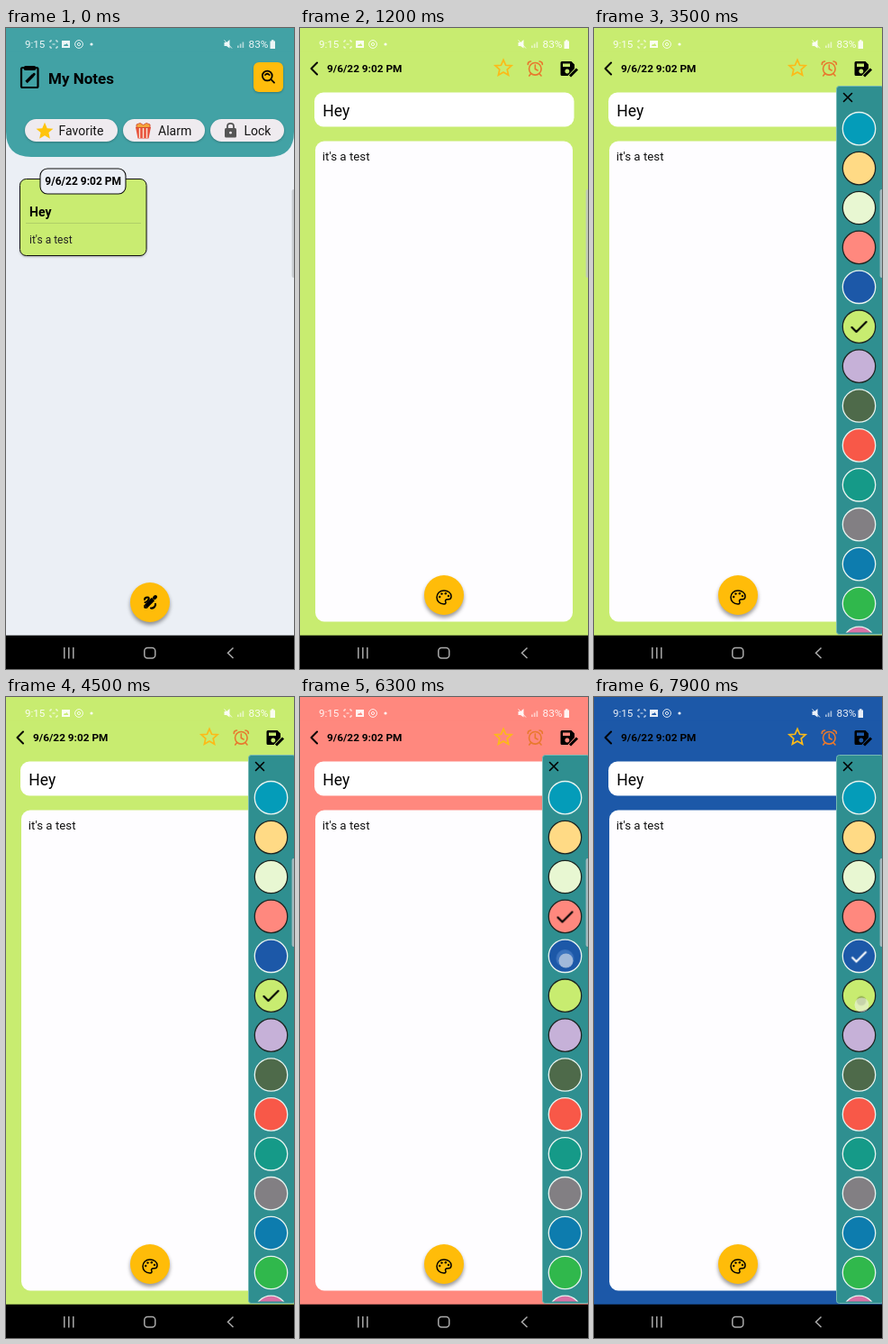
These frames come from a looping animation (320 px wide and 711 px high, 8000 ms). An HTML page:

```html
<!DOCTYPE html>
<html lang="en">
<head>
<meta charset="utf-8">
<title>Notes</title>
<style>
  html, body { margin: 0; width: 100%; height: 100%; overflow: hidden; background: #120f0f; }
  svg { position: absolute; left: 0; width: 320px; display: block; font-family: Roboto, "Liberation Sans", sans-serif; }
  .screen { top: 26px; height: 648px; }
  .frame { top: 0; height: 711px; }
  .b { font-weight: 700; }
  .line { fill: none; stroke: #000; stroke-linecap: round; stroke-linejoin: round; }
  .shadow { filter: drop-shadow(0 3px 2px #0006); }
  .soft { filter: drop-shadow(0 1px 1px #0004); }

  .list, .scrim, .note, .tint, .mini, .panel, .check { animation: 8s linear infinite; }
  .list { transform-origin: 160px 324px; animation-name: recede; }
  .scrim { animation-name: dim; }
  .note { transform-origin: 0 0; animation-name: open; }
  .tint { animation-name: tint; animation-timing-function: step-end; }
  .share { animation-name: share; }
  .mask { animation-name: mask; }
  .mini { transform-origin: 160px 629px; }
  .panel { animation-name: slide; }
  .lime { animation-name: lime; }
  .coral { animation-name: coral; }
  .navy { animation-name: navy; }

  /* --t is the moment of the tap within the loop */
  .tap circle { opacity: 0; transform-box: fill-box; transform-origin: center;
    animation: 8s linear calc(var(--t) - 8s) infinite; }
  .tap .ripple { animation-name: ripple; }
  .tap .dot { fill: #f2f2f2; animation-name: dot; }

  @keyframes recede {
    0%, 8.75% { transform: none; }
    11.25%, 100% { transform: scale(.955); }
  }
  @keyframes dim {
    0%, 8.75% { opacity: 0; }
    11.25%, 100% { opacity: .32; }
  }
  @keyframes open {
    0%, 8.75% { opacity: 0; transform: translate(15px, 141px) scale(.444); clip-path: inset(0 0 454px 0 round 14px); }
    9.6% { opacity: 1; }
    11.25% { transform: translate(6.5px, 59px) scale(.767); clip-path: inset(0 0 188px 0 round 3px);
      animation-timing-function: ease-out; }
    14.5%, 100% { opacity: 1; transform: none; clip-path: inset(0 0 0 0 round 0px); }
  }
  @keyframes tint {
    0% { fill: #42a2a5; }
    8.75% { fill: #c8ec70; }
    68.6% { fill: #ff887e; }
    81.2% { fill: #1c58a8; }
    100% { fill: #1c58a8; }
  }
  @keyframes share {
    0%, 26.5% { transform: scale(.4); }
    27.5% { transform: translateY(-31px) scale(.72); }
    30%, 35.5% { transform: translateY(-100px) scale(.85); }
    37.5%, 100% { transform: scale(.4); }
  }
  @keyframes mask {
    0%, 26.5% { transform: scale(.4); }
    27.5% { transform: translateY(-15px) scale(1.05); }
    30%, 35.5% { transform: translateY(-52px) scale(.85); }
    37.5%, 100% { transform: scale(.4); }
  }
  @keyframes slide {
    0%, 36% { transform: translateX(54px); animation-timing-function: ease-out; }
    40%, 100% { transform: none; }
  }
  @keyframes lime {
    0%, 68.1% { transform: scale(1); }
    70.3%, 100% { transform: scale(0); }
  }
  @keyframes coral {
    0%, 68.8% { transform: scale(0); }
    71%, 80.4% { transform: scale(1); }
    82.6%, 100% { transform: scale(0); }
  }
  @keyframes navy {
    0%, 81.2% { transform: scale(0); }
    83.4%, 100% { transform: scale(1); }
  }
  @keyframes ripple {
    0% { opacity: var(--o, .26); transform: scale(.2); }
    1.7% { opacity: var(--o, .26); transform: scale(1); }
    2.6% { opacity: var(--o, .26); transform: scale(1); }
    4.5%, 100% { opacity: 0; transform: scale(1); }
  }
  @keyframes dot {
    0%, 2.3% { opacity: .55; }
    3%, 100% { opacity: 0; }
  }
</style>
</head>
<body>

<svg class="screen list" viewBox="0 26 320 648">
  <defs>
    <path id="star" d="M0-9 2.6-3 9-2.5 4.2 1.7 5.6 8 0 4.6-5.6 8-4.2 1.7-9-2.5-2.6-3Z"/>
    <path id="tick" class="line" d="M-8 1-3 6 8-5" stroke-width="2.2"/>
    <g id="fab">
      <circle r="22" fill="#ffbc09"/>
    </g>
  </defs>
  <rect y="26" width="320" height="648" fill="#ebeff5"/>
  <path d="M0 26H320V115Q320 143 292 143H28Q0 143 0 115Z" fill="#42a2a5"/>

  <g class="line" stroke-width="2.2">
    <rect x="17" y="44" width="18.5" height="22" rx="1.5"/>
    <path d="M22 44.5H31" stroke-width="5"/>
    <path d="M22.5 60 30 52.5" stroke-width="3.4" stroke-linecap="butt"/>
    <path d="M30.5 52 31.2 51.3" stroke-width="3"/>
  </g>
  <text class="b" x="47" y="61.5" font-size="17">My Notes</text>

  <rect class="soft" x="275" y="38" width="33" height="33" rx="6" fill="#ffbc0c"/>
  <g class="line" stroke-width="1.8">
    <circle cx="290.3" cy="53" r="5.4"/>
    <path d="M294.5 57.2 298 60.7M288 52Q290.3 49.5 292.6 52"/>
  </g>

  <g class="soft" fill="#efebef">
    <rect x="21" y="101" width="103" height="25" rx="12.5"/>
    <rect x="130" y="101" width="91" height="25" rx="12.5"/>
    <rect x="227" y="101" width="82" height="25" rx="12.5"/>
  </g>
  <use href="#star" transform="translate(43 114.3) scale(1.05)" fill="#ffc40c"/>
  <path d="M144 110H161L158.5 122.5H146.5Z" fill="#e8523c"/>
  <path d="M148.5 111V122M152.5 111V122M156.5 111V122" stroke="#fbe6d4" stroke-width="1.4"/>
  <path d="M145 110.5V107L149 105.5 152.5 107.5 156 105.5 160 107V110.5Z" fill="#f4a53a" stroke="#cf4530" stroke-width=".8"/>
  <rect x="243" y="111" width="13" height="10.5" rx="1.5" fill="#555"/>
  <path d="M246 111V109Q246 105.8 249.5 105.8T253 109V111" fill="none" stroke="#555" stroke-width="1.8"/>
  <circle cx="249.5" cy="116.2" r="1.4" fill="#efebef"/>
  <g font-size="14" fill="#151515">
    <text x="58.5" y="118.7">Favorite</text>
    <text x="169" y="118.7">Alarm</text>
    <text x="264.5" y="118.7">Lock</text>
  </g>

  <rect class="soft" x="15.5" y="167.5" width="140.5" height="85" rx="7" fill="#c9ec71" stroke="#111"/>
  <rect x="38" y="156" width="95" height="28" rx="8" fill="#ebeff5" stroke="#111" stroke-width="1.1"/>
  <text class="b" x="43.3" y="174.3" font-size="12">9/6/22 9:02 PM</text>
  <text class="b" x="26" y="209" font-size="14">Hey</text>
  <path d="M22 216.5H150" stroke="#b0cf68"/>
  <text x="26" y="238.5" font-size="12" fill="#222">it's a test</text>
  <g class="tap" style="--t: .45s"><circle class="dot" cx="102" cy="215" r="8"/></g>

  <g class="shadow"><use href="#fab" x="160" y="637"/></g>
  <g class="line">
    <path d="M155.5 641.5 163.5 633.5" stroke-width="4.6" stroke-linecap="butt"/>
    <path d="M165 632 166 631" stroke-width="4"/>
    <path d="M153.8 640.5V643.2H156.5Z" fill="#000" stroke-width="1"/>
    <path d="M154 634Q154 631.5 157 631.5T158 634.5 154.5 637" stroke-width="2"/>
    <path d="M161 643.5Q163.5 644 165 642T166 639" stroke-width="2.2"/>
  </g>
  <rect class="scrim" y="26" width="320" height="648"/>
</svg>

<svg class="screen note" viewBox="0 26 320 648">
  <rect class="tint" y="26" width="320" height="648"/>
  <path class="line" d="M19 38.5 12.5 45 19 51.5" stroke-width="2"/>
  <text class="b" x="30" y="49.3" font-size="11.8">9/6/22 9:02 PM</text>
  <use href="#star" x="226" y="44.3" fill="none" stroke="#fcba18" stroke-width="1.7"/>
  <g fill="none" stroke="#e8792e" stroke-width="1.6" stroke-linecap="round">
    <circle cx="261.3" cy="45.3" r="6.8"/>
    <path d="M261.3 41V45.5L264 47M253.3 40.5Q253 37.5 256.5 37M269.3 40.5Q269.6 37.5 266 37M256.5 50.7 254.7 53M266 50.7 268 53"/>
  </g>
  <path fill-rule="evenodd" d="M291 37H301.5L305 40.5V45L297.5 53H291Q289.5 53 289.5 51.5V38.5Q289.5 37 291 37ZM292 39.5V43H300V39.5ZM296.8 45.5A2.5 2.5 0 1 0 296.9 45.5Z"/>
  <path d="M300 53.5 308 45.5" stroke="#000" stroke-width="3"/>

  <rect x="16" y="71.5" width="288.5" height="38" rx="10" fill="#fff"/>
  <text x="25.3" y="97.7" font-size="17.5">Hey</text>
  <rect x="17" y="125.5" width="286" height="533" rx="10" fill="#fefdff"/>
  <text x="24.8" y="147.2" font-size="13.3" fill="#111">it's a test</text>

  <g class="mini share">
    <use href="#fab" x="160" y="629"/>
    <path class="line" d="M149 631V628Q149 624.5 154 624.5H166" stroke-width="3"/>
    <path d="M163 618 172 625 163 631Z"/>
  </g>
  <g class="mini mask">
    <use href="#fab" x="160" y="629"/>
    <path class="line" d="M148 625Q152 620.5 157 623.5M163 623.5Q168 620.5 172 625M153 633Q160 639 167 633" stroke-width="1.8"/>
  </g>
  <g class="shadow"><use href="#fab" x="160" y="629"/></g>
  <path class="line" stroke-width="1.5" d="M160 624C155 624 152 627.5 152 631.5S155 639 160 639C162 639 162.4 637.5 161.7 636.2S162 633.8 163.8 633.8H165C167 633.8 168 632.5 168 630.5C168 626.5 164.5 624 160 624Z"/>
  <circle cx="155.2" cy="631" r="1.2"/>
  <circle cx="157.5" cy="627.6" r="1.2"/>
  <circle cx="161.8" cy="627.2" r="1.2"/>
  <circle cx="165" cy="630" r="1.2"/>
  <g class="tap" style="--t: 2.08s; --o: .55">
    <circle class="ripple" cx="160" cy="629" r="22" fill="#c7a596"/>
    <circle class="dot" cx="160" cy="632" r="8"/>
  </g>
  <g class="tap" style="--t: 2.72s"><circle class="dot" cx="161" cy="579" r="8"/></g>

  <g class="panel">
    <rect x="269.5" y="64.5" width="52" height="608" rx="3" fill="#2f8f90" stroke="#76b9b5"/>
    <path class="line" d="M277.5 72.5 286.5 81.5M286.5 72.5 277.5 81.5" stroke-width="1.6"/>
    <clipPath id="tray"><rect x="270" y="66" width="50" height="604.5"/></clipPath>
    <g id="swatches" clip-path="url(#tray)" stroke-width="1.3"></g>
    <g class="tap" style="--t: 5.35s">
      <circle class="ripple" cx="294.5" cy="243.5" r="18"/>
      <circle class="dot" cx="295.5" cy="251" r="8"/>
    </g>
    <g class="tap" style="--t: 6.23s">
      <circle class="ripple" cx="294.5" cy="290" r="16" fill="#9cc4ff"/>
      <circle class="dot" cx="295.5" cy="292.5" r="8"/>
    </g>
    <g class="tap" style="--t: 7.86s">
      <circle class="ripple" cx="297" cy="337" r="12"/>
      <circle class="dot" cx="297.5" cy="341.5" r="8"/>
    </g>
    <g transform="translate(294.5 331)"><use class="check lime" href="#tick"/></g>
    <g transform="translate(294.5 243.5)"><use class="check coral" href="#tick"/></g>
    <g transform="translate(294.5 287.5)"><path class="check navy" d="M-8 1-3 6 8-5" fill="none" stroke="#fff" stroke-width="2.2"/></g>
  </g>
</svg>

<svg class="frame" viewBox="0 0 320 711">
  <rect class="tint" width="320" height="26.2"/>
  <g fill="#fff" fill-opacity=".9">
    <text x="21" y="22" font-size="11.6">9:15</text>
    <text x="269.5" y="22" font-size="11.8">83%</text>
    <path d="M62 14H71V22H62ZM64 20H69.5L67.5 17 66 18.7 65.2 17.8Z" fill-rule="evenodd"/>
    <circle cx="95" cy="18" r="1.6"/>
    <path d="M242.5 16H245L248.5 13V22.5L245 20H242.5Z"/>
    <path d="M257 22V19.5H258.6V22ZM259.8 22V17.5H261.4V22ZM262.6 22V15.5H264.2V22Z" fill-opacity=".6"/>
    <path d="M293.5 14.5H295V13.3H297.5V14.5H299V23H293.5Z"/>
  </g>
  <g fill="none" stroke="#fff" stroke-opacity=".85">
    <path d="M49 16V14H51M55 14H57V16M57 20V22H55M51 22H49V20M51.5 18H54.5"/>
    <circle cx="81" cy="18" r="4.4"/>
    <circle cx="81" cy="18" r="1.6"/>
    <path d="M242.5 13.5 251 22.5"/>
  </g>
  <rect x="317.6" y="179" width="4" height="98" rx="2" fill="#bfc3c8" fill-opacity=".8"/>
  <rect y="673.7" width="320" height="38"/>
  <g fill="none" stroke="#aaa" stroke-width="1.5">
    <path d="M64.8 687V699.5M69.8 687V699.5M74.8 687V699.5M252.5 687.5 246.5 693.3 252.5 699"/>
    <rect x="153.8" y="687.5" width="12" height="11.5" rx="3.5"/>
  </g>
</svg>

<script>
  const light = "#e8f4f0", dark = "#1c2622";
  const swatches = [
    ["#049cb9", light], ["#ffda85", dark], ["#e8f7d2", dark], ["#ff887e", dark], ["#1c58a8", light],
    ["#c8ec70", dark], ["#c6b1d8", dark], ["#4e6a4a", light], ["#f85848", light], ["#159a88", light],
    ["#827f83", light], ["#0d7cae", light], ["#30b84c", light], ["#d870a4", light]
  ];
  document.getElementById("swatches").innerHTML = swatches.map(([fill, edge], i) =>
    `<circle cx="294.5" cy="${111.7 + 43.9 * i}" r="18.2" fill="${fill}" stroke="${edge}"/>`).join("");
</script>
</body>
</html>
```
